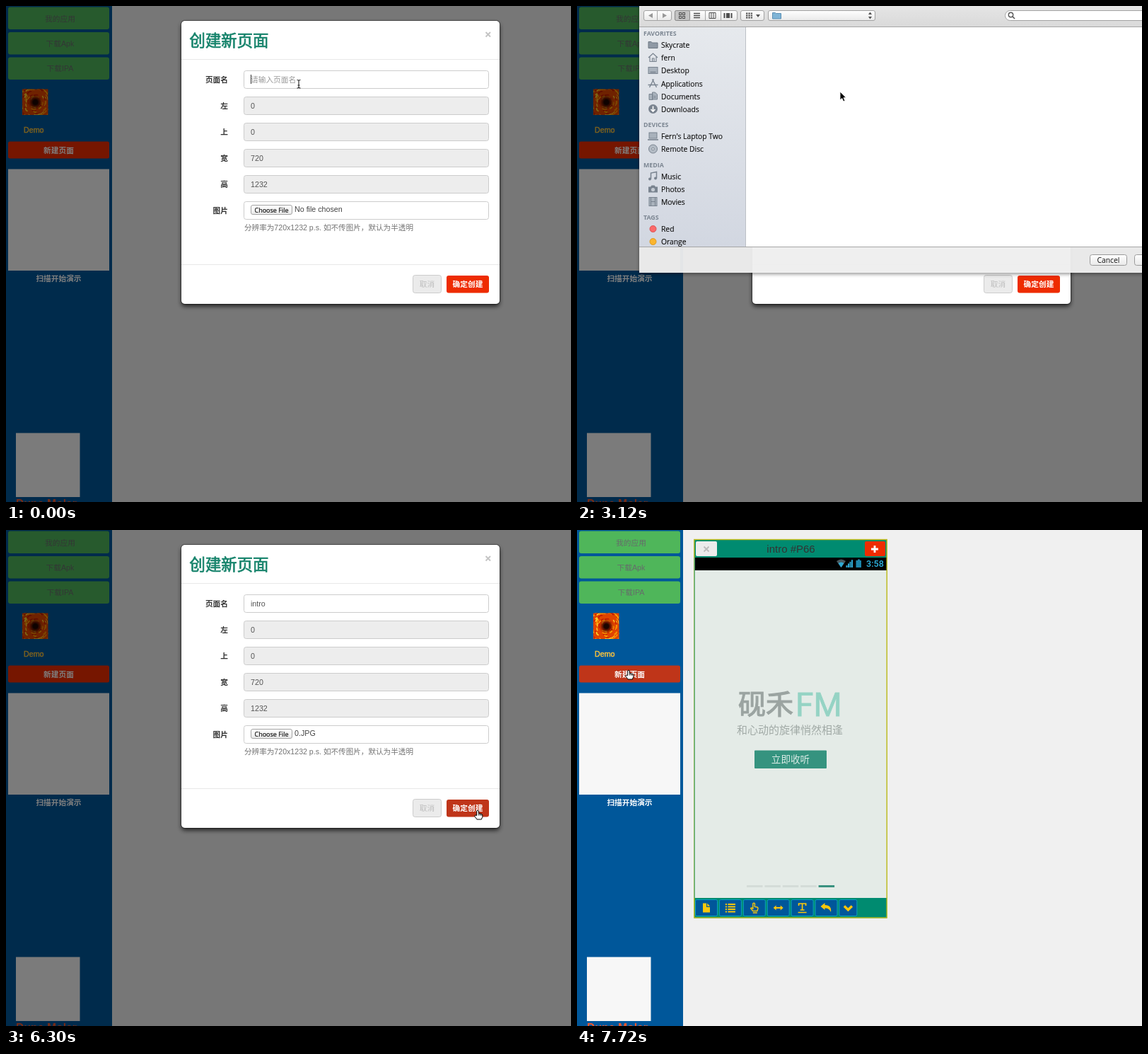
These frames come from a looping animation (799 px wide and 701 px high, 8000 ms). An HTML page:

```html
<!DOCTYPE html>
<html lang="zh">
<head>
<meta charset="utf-8">
<title>创建新页面</title>
<style>
html, body { margin: 0; width: 100%; height: 100%; overflow: hidden; background: #f0f0f0; }
svg { display: block; width: 100vw; height: 100vh; }
text { font-family: "Liberation Sans", "Noto Sans CJK SC", "Noto Sans CJK", sans-serif; font-size: 10.7px; white-space: pre; }
.ui { font-family: "Open Sans", "Noto Sans", sans-serif; font-size: 10.3px; }
</style>
</head>
<body>
<svg id="stage" viewBox="0 0 799 701" preserveAspectRatio="none">
  <defs>
    <filter id="modalShadow" x="-10%" y="-10%" width="120%" height="120%">
      <feDropShadow dx="0" dy="3.5" stdDeviation="3" flood-opacity=".72"/>
    </filter>
    <filter id="sheetShadow" x="-5%" y="-5%" width="110%" height="110%">
      <feDropShadow dx="0" dy="2" stdDeviation="2.5" flood-opacity=".45"/>
    </filter>
    <filter id="blur"><feGaussianBlur stdDeviation="1.6"/></filter>
    <linearGradient id="bar" x2="0" y2="1"><stop stop-color="#ededed"/><stop offset="1" stop-color="#d9d9d9"/></linearGradient>
    <linearGradient id="side" x2="0" y2="1"><stop stop-color="#e6e9ed"/><stop offset="1" stop-color="#d2d7e1"/></linearGradient>
    <linearGradient id="btn" x2="0" y2="1"><stop stop-color="#fff"/><stop offset="1" stop-color="#e9e9e9"/></linearGradient>
    <linearGradient id="blue" x2="0" y2="1"><stop stop-color="#a9cdf5"/><stop offset="1" stop-color="#4d92e6"/></linearGradient>
    <radialGradient id="core"><stop offset=".3" stop-color="#1c0500"/><stop offset=".6" stop-color="#5a0c00" stop-opacity=".7"/><stop offset="1" stop-color="#a01000" stop-opacity="0"/></radialGradient>
    <clipPath id="iconClip"><rect x="23" y="117.5" width="36.5" height="36.5"/></clipPath>
  </defs>
</svg>
<script>
const LOOP = 8000;
const RED = '#ee2c00', RED_HOVER = '#bf3519', NAVY = '#00579a', GREEN = '#008b70', GOLD = '#fac70c';

const rect = (x, y, w, h, fill, more = '') =>
  `<rect x="${x}" y="${y}" width="${w}" height="${h}" fill="${fill}" ${more}/>`;
const text = (x, y, s, fill, more = '') => `<text x="${x}" y="${y}" fill="${fill}" ${more}>${s}</text>`;
const path = (d, fill, more = '') => `<path d="${d}" fill="${fill}" ${more}/>`;
const line = (d, color, width = 1, more = '') => path(d, 'none', `stroke="${color}" stroke-width="${width}" ${more}`);
const group = (id, body, more = '') => `<g id="${id}" ${more}>${body}</g>`;
const mid = 'text-anchor="middle"', bold = 'font-weight="700"', midBold = mid + ' ' + bold;
const size = px => `style="font-size:${px}px"`;
const thicken = (color, w) => `stroke="${color}" stroke-width="${w}"`;

// Short seeded strokes, each following a spiral around the centre.
function swirl() {
  let seed = 7, flames = '';
  const rand = () => (seed = seed * 16807 % 2147483647) / 2147483647;
  const colors = ['#ffb400', '#f98c00', '#ffcf2a', '#c41c00'];
  for (let i = 0; i < 90; i++) {
    const r = 6 + rand() * 19, len = 3 + rand() * 5;
    flames += line(`M${r} 0q1 ${len / 2} ${-len / 4} ${len}`, colors[i % 4], .8 + rand() * 1.3,
      `transform="rotate(${rand() * 360})"`);
  }
  return `<g clip-path="url(#iconClip)">${rect(23, 117, 37, 37, '#e04400')}
    <g transform="translate(41.5 136)">${flames}<circle r="11" fill="url(#core)"/></g></g>`;
}

function sidebar() {
  const links = ['我的应用', '下载Apk', '下载IPA'].map((s, i) =>
    rect(3, 1.5 + i * 35.5, 143, 31.5, '#4fb65a', 'rx="3"') + text(76.5, 21.5 + i * 35.4, s, '#666b6b', mid)).join('');
  return rect(0, 0, 150, 701, NAVY) + links + swirl() +
    text(25, 178.5, 'Demo', '#fbc33c', thicken('#fbc33c', .45)) +
    rect(3, 191.5, 143, 24, RED, 'rx="2.5" id="newPage"') + text(74.5, 207.5, '新建页面', '#fff', midBold) +
    rect(3, 230.5, 143, 143.5, '#f7f7f7') + text(74.5, 389, '扫描开始演示', '#fff', midBold) +
    rect(14, 603.5, 90.5, 90.5, '#f7f7f7') + text(14, 709, 'Dune Molar', '#f0582c', bold + ' ' + size(15.8));
}

function phone() {
  const tool = (x, w, icon) => rect(x + .5, 522.5, w - 1, 23, NAVY, 'rx="2" stroke="#0aa0c0"') +
    `<g transform="translate(${x + w / 2} 534)">${icon}</g>`;
  const stroke = (d, w = 2) => line(d, GOLD, w);
  const fill = d => path(d, GOLD);
  const icons = [
    fill('M-5-6.5H0V-1H5V6.5H-5ZM1.2-6.5 5-2.2H1.2Z'),
    stroke('M-7-5h2M-7-1.5h2M-7 2h2M-7 5.5h2M-3.5-5H7M-3.5-1.5H7M-3.5 2H7M-3.5 5.5H7'),
    line('M-2 2V-6q1.3-1.8 2.6 0V-1.5L4-1q1.5.5 1 2.5L4 4.5H-2L-5 1q0-2 3 0M-2 7H4', GOLD, 1.4),
    stroke('M-4 0H4') + fill('M-7 0-3-3.5V3.5ZM7 0 3-3.5V3.5Z'),
    stroke('M-5-3V-6H5V-3M0-6V3M-3 3H3M-6 6.5H6', 1.7),
    fill('M-8-2-2-7V-4Q8-4 6.5 6 4 0-2 .5V3Z'),
    stroke('M-5.5-2.5 0 2.8 5.5-2.5', 3.4)
  ];
  const tools = icons.map((icon, i) => tool(167 + i * 33.9, i < 6 ? 32 : 26, icon)).join('');
  const dots = [0, 1, 2, 3, 4].map(i => rect(240 + i * 25.4, 502, 22.5, 3, i < 4 ? '#d4dcd8' : '#3a9280')).join('');
  const bars = [0, 1, 2, 3].map(i => rect(380.5 + i * 2.5, 50 - i * 2.6, 2, 3 + i * 2.6, '#2fa9d4')).join('');
  return rect(165.5, 13.5, 273, 535, GREEN) +
    rect(168, 16, 30, 21, '#ececec', 'rx="2"') + line('M179.5 23.5l7 7m0-7l-7 7', '#bcbcbc', 1.8) +
    text(302.5, 32, 'intro #P66', '#333', mid + ' ' + size(15)) +
    rect(407, 16, 29, 21, RED, 'rx="2"') + line('M416 27h10M421 22v10', '#fff', 2.8) +
    rect(166, 39, 272, 18, '#000') +
    path('M367 44Q373.5 39 380 44L373.5 53Z', '#4a5a60') + path('M369.5 47Q373.5 44 377.5 47L373.5 53Z', '#2fa9d4') +
    bars + path('M394.5 43H397V41.5H400V43H402V53H394.5Z', '#1c86ac') +
    text(409, 52, '3:58', '#2fb4e2', 'font-weight="500" style="font-family:Roboto,sans-serif;font-size:12.6px"') +
    rect(166, 57, 272, 463, '#e4ebe7') +
    text(228, 260, '砚禾', '#9ba4a1', thicken('#9ba4a1', 1.2) + size(39)) +
    text(309, 263, 'FM', '#95d3c4', thicken('#95d3c4', .8) + 'style="font-family:Roboto,sans-serif;font-size:46px"') +
    text(301, 287.5, '和心动的旋律悄然相逢', '#a1aaa6', mid + ' ' + size(15)) +
    rect(251, 311.5, 102, 25.5, '#35937f', 'rx="1"') + text(302, 329, '立即收听', '#dcece7', mid + ' ' + size(13.6)) +
    dots + tools +
    rect(165.8, 13.5, 272.4, 534.5, 'none', 'stroke="#c3bd1c" stroke-width="1.4"') +
    line('M166.2 39V520', '#48aa92', 1.2);
}

function modal() {
  const rows = ['页面名', '左', '上', '宽', '高', '图片'];
  const values = ['', '0', '0', '720', '1232', ''];
  const fields = rows.map((s, i) => {
    const y = 91.5 + i * 37, off = i > 0 && i < 5;
    return text(314, y + 16.5, s, '#333', 'text-anchor="end" ' + bold) +
      rect(336.5, y, 346, 25, off ? '#ededed' : '#fff', 'rx="3" stroke="#ccc"') +
      text(346, y + 16.5, values[i], '#555');
  }).join('');
  const glow = group('glow',
    rect(336.5, 91.5, 346, 25, 'none', 'rx="3" stroke="#66afe9" stroke-width="3" filter="url(#blur)"') +
    rect(336.5, 91.5, 346, 25, '#fff', 'rx="3" stroke="#5fb0ea"'));
  return rect(248, 21, 450, 400, '#fff', 'rx="5" filter="url(#modalShadow)"') +
    rect(247.5, 20.5, 451, 401, 'none', 'rx="5" stroke="#000" stroke-opacity=".35"') +
    text(259.5, 56.5, '创建新页面', '#16836b', thicken('#16836b', .7) + size(22.4)) +
    line('M678.5 37l6.5 6.5m0-6.5l-6.5 6.5', '#c4c4c4', 1.9) +
    line('M248 75.5H698M248 365.5H698', '#e8e8e8') + fields + glow +
    text(346, 108, '请输入页面名', '#999', 'id="hint"') + text(346, 108, '', '#555', 'id="name"') +
    rect(346, 97, 1, 13, '#333', 'id="caret"') +
    rect(346.5, 281.5, 58, 13, 'url(#btn)', 'rx="2.5" stroke="#a3a3a3" id="choose"') +
    text(375.5, 291.5, 'Choose File', '#111', `class="ui" ${mid} ${thicken('#111', .2)} ${size(9)}`) +
    text(408, 291, '', '#444', 'id="file"') +
    text(337, 316.5, '分辨率为720x1232 p.s. 如不传图片，默认为半透明', '#737373', size(10.6)) +
    rect(575.5, 380.5, 40, 25, '#ebebeb', 'rx="3" stroke="#ccc"') + text(595.5, 397, '取消', '#bdbdbd', mid) +
    rect(623, 381, 60, 24.5, RED, 'rx="3" id="confirm"') + text(653, 397, '确定创建', '#fff', midBold);
}

const GRAY = '#79838f';
const glyphs = {
  folder: path('M-6.5-4.5h4l1.5 1.5h7.5v7.5h-13z', '#8f99a5', 'stroke="#6e7884"'),
  home: line('M-6.5 0 0-6 6.5 0M-4.5-1V5.5H4.5V-1M-1 5.5V1H1.5V5.5', GRAY, 1.2),
  desk: rect(-6.5, -4.5, 13, 9, '#a9b2bc', `stroke="${GRAY}"`) + line('M-4 2.5H4', GRAY, 1.5),
  apps: line('M-5 5.5 1-6M5 5.5-1-6M-7 2H7', GRAY, 1.4),
  docs: path('M-5.5-3h5v8h-5zM-1-5.5h4l3 3v7h-7z', '#a9b2bc', `stroke="${GRAY}"`) + line('M1 0H4M1 2H4', GRAY),
  down: `<circle r="6.5" fill="${GRAY}"/>` + line('M0-4V3M-3 .5 0 3.5 3 .5', '#fff', 1.6),
  laptop: rect(-5.5, -5, 11, 8, '#a9b2bc', `stroke="${GRAY}"`) + line('M-7.5 5H7.5', GRAY, 1.6),
  disc: `<circle r="6" fill="#b4bcc5" stroke="${GRAY}"/><circle r="1.7" fill="#e6e9ed" stroke="${GRAY}"/>`,
  music: line('M-3 4V-4.5L5-6V3', GRAY, 1.5) + `<circle cx="-4.5" cy="4" r="2" fill="${GRAY}"/><circle cx="3.5" cy="3" r="2" fill="${GRAY}"/>`,
  photo: path('M-6.5-3h3l1.5-2h4l1.5 2h3v8h-13z', GRAY) + '<circle cy="1" r="2.6" fill="#c3cad2"/>',
  movie: rect(-5.5, -6, 11, 12, '#a9b2bc', `stroke="${GRAY}"`) + line('M-3-6V6M3-6V6M-3 0H3', GRAY),
  red: '<circle r="4.5" fill="#fb6a6a" stroke="#dc5252"/>',
  orange: '<circle r="4.5" fill="#fbb52e" stroke="#dd9a20"/>'
};

function sheet() {
  const places = [
    [39, 'FAVORITES'], [55, 'Skycrate', 'folder'], [73, 'fern', 'home'], [91, 'Desktop', 'desk'],
    [109.5, 'Applications', 'apps'], [127.5, 'Documents', 'docs'], [145.5, 'Downloads', 'down'],
    [168, 'DEVICES'], [184, "Fern's Laptop Two", 'laptop'], [202, 'Remote Disc', 'disc'],
    [224.5, 'MEDIA'], [240.5, 'Music', 'music'], [258.5, 'Photos', 'photo'], [276.5, 'Movies', 'movie'],
    [299, 'TAGS'], [315, 'Red', 'red'], [333, 'Orange', 'orange']
  ];
  const list = places.map(([y, s, icon]) => icon
    ? `<g transform="translate(107.5 ${y})">${glyphs[icon]}</g>` + text(119, y + 4, s, '#111', 'class="ui" ' + thicken('#111', .15))
    : text(94, y + 3, s, '#7b8591', `class="ui" ${bold} ${size(8.8)}`)).join('');
  const box = (x, w) => rect(x + .5, 6.5, w - 1, 14, 'url(#btn)', 'rx="2.5" stroke="#a2a2a2"');
  const ink = '#505050';
  const tools = box(94, 40) + line('M113.5 6.5V20.5', '#a8a8a8') +
    path('M107 10V17L101 13.5ZM121 10V17L127 13.5Z', '#999') +
    box(138, 89) + rect(138.5, 6.5, 21, 14, '#c2c2c2', 'rx="2" stroke="#888"') +
    line('M181.5 6.5V20.5M203.5 6.5V20.5', '#a8a8a8') +
    [0, 1, 2, 3].map(i => rect(144.5 + i % 2 * 5, 9.5 + (i >> 1) * 5, 3, 3, 'none', `stroke="${ink}"`)).join('') +
    line('M165 10.5H174M165 13.5H174M165 16.5H174', ink, 1.4) +
    line('M187 9.5H196V17.5H187ZM190 9.5V17.5M193 9.5V17.5', ink) +
    rect(211, 10, 5, 7, ink) + line('M208.5 10V17M218.5 10V17', ink, 2) +
    box(231, 34) + line('M239 10.5H248M239 13.5H248M239 16.5H248', ink, 2, 'stroke-dasharray="2.4 1"') + path('M253 12H259L256 16Z', ink) +
    box(270, 152) + path('M276.5 9.5h4l1 1h7v7.5h-12z', '#7fb4d6', 'stroke="#5b8fb4"') +
    path('M412 12H417L414.5 8.5ZM412 15H417L414.5 18.5Z', ink) +
    rect(605.5, 6.5, 240, 14, '#fff', 'rx="7" stroke="#a2a2a2"') +
    '<circle cx="613.5" cy="12.5" r="3.2" fill="none" stroke="#555" stroke-width="1.4"/>' + line('M616 15l3 3', '#555', 1.6);
  const item = group('item', rect(288, 52, 28, 36, '#d5ddda', 'stroke="#a8b0ad"') +
    rect(281, 93, 42, 14, '#3875d7', 'rx="6" id="picked"') + text(302, 103.5, '0.JPG', '#111', `class="ui" ${mid} id="itemName"`));
  return rect(88, -20, 760, 397, '#f2f2f2', 'fill-opacity=".92" filter="url(#sheetShadow)"') +
    rect(88, -20, 760, 50, 'url(#bar)') + rect(88, 30, 150, 310, 'url(#side)') +
    rect(238, 30, 600, 310, '#fff') + line('M238.5 30V340', '#bcc0c6') +
    line('M88 29.5H799M88 340.5H799', '#a6a6a6') + tools + list + item +
    rect(725.5, 351.5, 52, 15, 'url(#btn)', 'rx="3" stroke="#9a9a9a"') +
    text(751.5, 363, 'Cancel', '#111', 'class="ui" ' + mid) +
    rect(788.5, 351.5, 60, 15, 'url(#btn)', 'rx="3" stroke="#9a9a9a" id="open"');
}

const pointers =
  group('arrow', path('M0 0V12L2.8 9.5 4.8 14 7 13 5 8.7H8.6Z', '#000', 'stroke="#fff" stroke-width=".9"')) +
  group('beam', line('M-2.5-5.5Q0-5.5 0-4Q0-5.5 2.5-5.5M0-4V4.5M-2.5 6Q0 6 0 4.5Q0 6 2.5 6M-1.5 2H1.5', '#222', 1.1)) +
  group('hand', path('M-1.3 1Q0-1 1.3 1V4.5L6 5.5 6.8 7V9.5L5.3 13H-1L-4.3 8.5Q-4-.5 6-1.3 7.5Z'.replace('Q-4-.5 6', 'Q-4 6'), '#fff',
    'stroke="#000" stroke-linejoin="round"') + line('M1.3 5V7.5M3.2 5V7.5M5 5.5V8', '#000', .8));

document.getElementById('stage').insertAdjacentHTML('beforeend',
  rect(0, 0, 799, 701, '#f0f0f0') + sidebar() + group('phone', phone()) +
  rect(0, 0, 799, 701, '#000', 'id="shade"') + group('modal', modal()) + group('sheet', sheet()) + group('pointer', pointers));

const el = {};
document.querySelectorAll('#stage [id]').forEach(n => { el[n.id] = n; });

// Each track holds [time, ...values]; values stay until the next entry.
const tracks = {
  name: [[0, ''], [520, 'in'], [680, 'intr'], [960, 'intro']],
  glow: [[0, 0], [140, .6], [520, 1], [2470, 0]],
  caret: [[0, 1], [1430, 0], [1730, 1], [2470, 0]],
  sheet: [[0, -420], [2630, -250], [2800, -70], [2960, 0], [4485, -150], [4660, -346], [4960, -420]],
  shade: [[0, .5], [6590, .4], [6890, 0]],
  modal: [[0, 1, 0], [6440, .5, -40], [6590, 0, -100]],
  pointer: [
    [0, 'beam', 414, 110], [520, '', 0, 0], [1430, 'beam', 417, 114], [1580, 'arrow', 412, 178],
    [1730, 'arrow', 404, 255], [1870, 'arrow', 398, 295], [2020, 'arrow', 395, 292],
    [2800, 'arrow', 390, 240], [2960, 'arrow', 380, 170], [3120, 'arrow', 372, 121],
    [3480, 'arrow', 360, 112], [3660, 'arrow', 338, 92], [3830, 'arrow', 316, 77], [4010, 'arrow', 307, 72],
    [4960, 'arrow', 470, 235], [5170, 'arrow', 655, 407], [5550, 'hand', 662, 400], [5700, 'hand', 667, 396],
    [6590, 'arrow', 559, 301], [6890, 'arrow', 258, 163], [7310, 'arrow', 72, 189], [7720, 'hand', 73, 198]
  ]
};
const at = (track, t) => tracks[track].filter(k => k[0] <= t).pop().slice(1);
const set = (id, attr, value) => el[id].setAttribute(attr, value);
const show = (id, on) => set(id, 'visibility', on ? 'visible' : 'hidden');

function draw(t) {
  const [name] = at('name', t);
  el.name.textContent = name;
  show('hint', !name);
  show('caret', at('caret', t)[0]);
  set('caret', 'x', 346 + (name ? el.name.getComputedTextLength() : 0));
  set('glow', 'opacity', at('glow', t)[0]);
  set('choose', 'fill', t >= 2470 && t < 2630 ? '#c8c8c8' : 'url(#btn)');
  el.file.textContent = t < 4960 ? 'No file chosen' : '0.JPG';
  set('confirm', 'fill', t >= 5550 ? RED_HOVER : RED);
  set('newPage', 'fill', t >= 7720 ? RED_HOVER : RED);

  const [alpha, rise] = at('modal', t);
  set('modal', 'opacity', alpha);
  set('modal', 'transform', `translate(0 ${rise})`);
  set('shade', 'opacity', at('shade', t)[0]);
  set('phone', 'display', t >= 6890 ? 'inline' : 'none');

  const picked = t >= 4310;
  set('sheet', 'transform', `translate(0 ${at('sheet', t)[0]})`);
  set('item', 'display', t >= 3480 ? 'inline' : 'none');
  set('picked', 'opacity', picked ? 1 : 0);
  set('itemName', 'fill', picked ? '#fff' : '#111');
  set('open', 'fill', picked ? 'url(#blue)' : 'url(#btn)');

  const [kind, x, y] = at('pointer', t);
  for (const id of ['arrow', 'beam', 'hand']) show(id, id === kind);
  set('pointer', 'transform', `translate(${x} ${y})`);
}

const start = performance.now();
function tick() {
  draw((performance.now() - start) % LOOP);
  requestAnimationFrame(tick);
}
tick();
</script>
</body>
</html>
```
